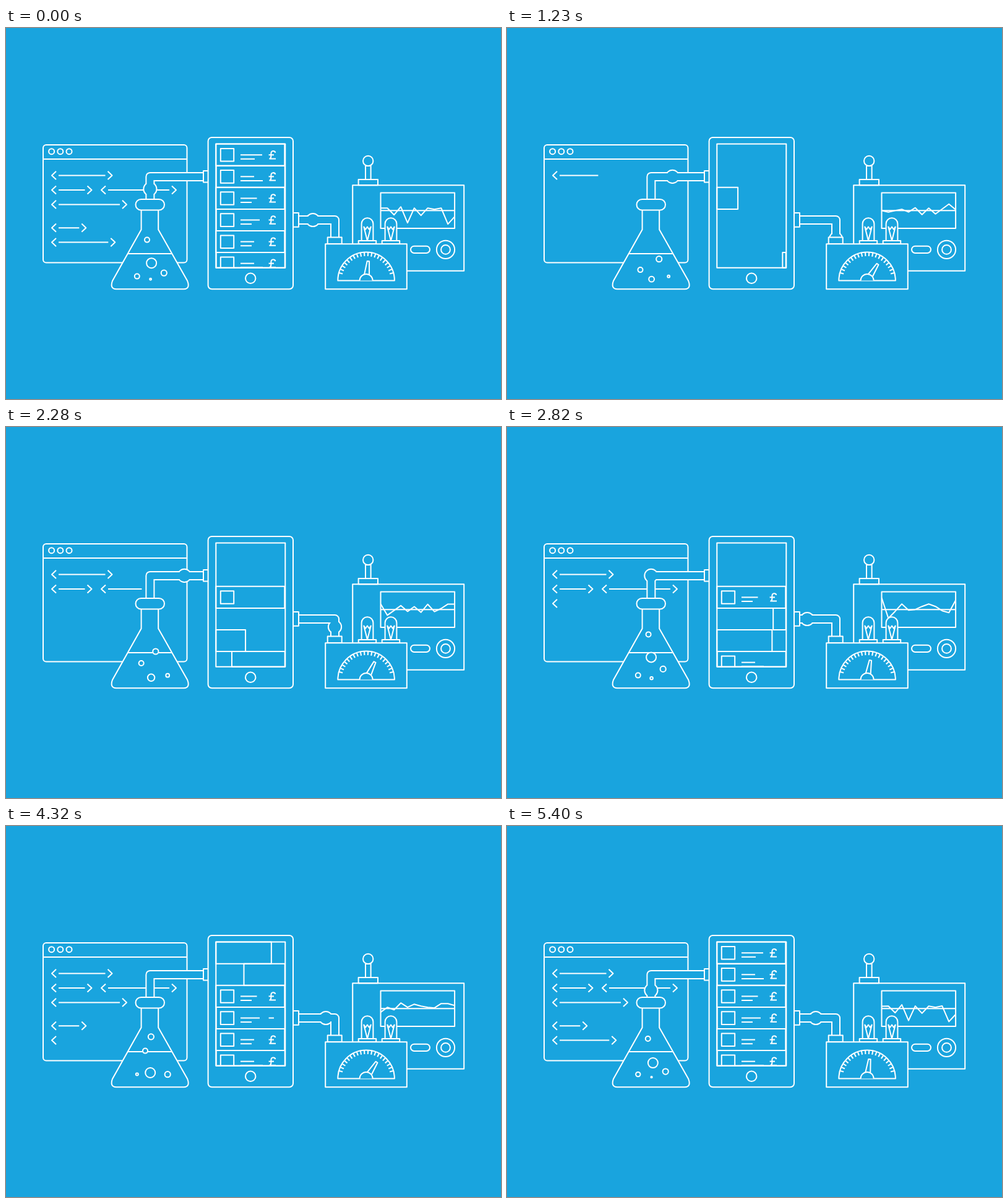
An HTML page that plays this animation: 800 by 600 pixels, repeating every 5.43 s.

```html
<!DOCTYPE html>
<html lang="en">
<head>
<meta charset="utf-8">
<title>Lab machine</title>
<style>
  html, body { margin: 0; width: 100%; height: 100%; overflow: hidden; background: #19a4de; }
  svg { display: block; width: 800px; height: 600px; }
  .line { fill: none; stroke: #fff; stroke-width: 2; stroke-linejoin: round; }
  .solid { fill: #19a4de; }
  .outer, .inner { fill: none; stroke-linejoin: round; }
  .outer { stroke: #fff; stroke-width: 15; }
  .inner { stroke: #19a4de; stroke-width: 11; }
</style>
</head>
<body>
<svg viewBox="0 0 800 600">
  <defs>
    <clipPath id="clipLeft"><rect x="200" y="215" width="119" height="64"/></clipPath>
    <clipPath id="clipRight"><rect x="473" y="290" width="80" height="50"/></clipPath>
    <clipPath id="clipScreen"><rect x="338" y="186" width="114" height="203"/></clipPath>
    <clipPath id="clipGraph"><rect x="605" y="266" width="120.5" height="59"/></clipPath>
  </defs>

  <g class="line">
    <rect x="60" y="189" width="232.5" height="190.5" rx="5"/>
    <path d="M60 212H292.5"/>
    <circle id="dot" cx="73.6" cy="199.7" r="4.5"/>
    <use href="#dot" x="14.2"/>
    <use href="#dot" x="28.4"/>
    <g id="code"></g>
  </g>

  <g id="pipeLeft" clip-path="url(#clipLeft)"></g>

  <g class="line">
    <path class="solid" d="M218.6 294V326L172 409Q167.5 421.500 178 422.3H287.5Q298 421.5 293.2 409L246.2 326V294"/>
    <path d="M196.8 365H268.5"/>
    <g id="bubbles" class="solid"></g>
    <rect class="solid" x="209.5" y="277" width="46.5" height="17.6" rx="8.8"/>

    <rect class="solid" x="319" y="231" width="10" height="18.6"/>
    <rect class="solid" x="326.6" y="177" width="137.4" height="245.2" rx="6"/>
    <rect x="339.3" y="187.5" width="112" height="200.3"/>
    <circle cx="395.2" cy="404.8" r="8.2"/>
    <g id="rows" clip-path="url(#clipScreen)"></g>
  </g>

  <g id="pipeRight" clip-path="url(#clipRight)"></g>

  <g class="line">
    <rect x="464" y="299" width="9" height="22.7"/>
    <rect x="560.2" y="254.2" width="180" height="138.5"/>
    <rect x="569.6" y="245" width="31.4" height="9.2"/>
    <path d="M581 245V222M589.6 245V222"/>
    <circle class="solid" cx="585.2" cy="214.9" r="8.2"/>
    <rect x="605.5" y="266.6" width="119.6" height="57.3"/>
    <path d="M605.5 295.2H725"/>
    <g clip-path="url(#clipGraph)"><path id="graph"/></g>
    <rect x="654" y="352.7" width="31" height="11.2" rx="5.6"/>
    <circle cx="710.5" cy="358.4" r="14.6"/>
    <circle cx="710.5" cy="358.4" r="7.4"/>

    <g id="bulb" class="solid">
      <path d="M574.6 344V316.6a9.4 9.4 0 0 1 18.8 0V344"/>
      <path d="M584 344L578.3 321.5l2.8 4.2 2.9-4.2 2.9 4.2 2.8-4.2z"/>
      <rect x="569.7" y="344" width="28.5" height="5.2"/>
    </g>
    <use href="#bulb" x="38"/>
    <rect class="solid" x="519.7" y="338.6" width="23" height="10.6"/>
    <rect class="solid" x="516.2" y="349.2" width="131.6" height="73"/>
    <g transform="translate(582.1 408.4)">
      <path d="M-45.8 0A45.8 45.8 0 0 1 45.8 0Z"/>
      <g id="ticks"></g>
      <path id="needle" class="solid" d="M-4-9.5L-1.7-31.5H1.7L4-9.5"/>
      <path class="solid" d="M-10.5 0a10.5 10.5 0 0 1 21 0"/>
    </g>
  </g>
</svg>

<script>
const LOOP = 5430, STEP = 30, BEAT = LOOP / 6, CLEARED = 660;
const $ = id => document.getElementById(id);

function add(parent, tag, attrs = {}) {
  const el = document.createElementNS('http://www.w3.org/2000/svg', tag);
  set(el, attrs);
  parent.appendChild(el);
  return el;
}
function set(el, attrs) {
  for (const k in attrs) el.setAttribute(k, attrs[k]);
}
const show = (el, on) => set(el, { display: on ? 'inline' : 'none' });
const clamp = x => Math.max(0, Math.min(1, x));
const mix = (a, b, k) => a + (b - a) * k;

// keys: [time, ...values]; two keys at one time make a jump
function at(keys, t, ease = x => x) {
  let i = 0;
  while (i < keys.length - 2 && keys[i + 1][0] <= t) i++;
  const [a, b] = [keys[i], keys[i + 1]];
  const k = ease(clamp((t - a[0]) / (b[0] - a[0])));
  return a.slice(1).map((v, n) => mix(v, b[n + 1], k));
}
const sway = x => (1 - Math.cos(Math.PI * x)) / 2;

// Code tags: y, left tip, line end, start time
const TYPING = 0.16;
const tags = [
  [238.4, 74, 160.5, 780], [262, 74, 127.5, 1403], [262, 154, 264, 1880],
  [285.4, 74, 184, 2800], [323.2, 74, 118.3, 3720], [346.6, 74, 165.3, 4290]
].map(([y, x, end, start]) => ({
  y, x, end, start,
  open: add($('code'), 'path', { d: `M${x + 7} ${y - 6.6}l-7 6.6l7 6.6` }),
  body: add($('code'), 'path'),
  close: add($('code'), 'path', { d: `M${end + 4} ${y - 6.6}l7 6.6l-7 6.6` })
}));

function drawCode(t) {
  for (const g of tags) {
    const from = g.x + 11, grown = (t - g.start - 60) * TYPING;
    show(g.open, t >= g.start);
    show(g.body, grown > 0);
    set(g.body, { d: `M${from} ${g.y}H${Math.min(g.end, from + grown)}` });
    show(g.close, t >= g.start + 90 + (g.end - from) / TYPING);
  }
}

// List rows: the ends of the two text lines and the start time
const ROW = 35.1, ROW_WIDTH = 111, ROW_TIME = 1450;
const rows = [
  [414, 402, 3150], [401, 415, 3455], [405.5, 397, 788],
  [410, 397, 2552], [401, 397, 1656], [401, 415, 1160]
].map(([end1, end2, start], i) => {
  const g = add($('rows'), 'g', { transform: `translate(0 ${187.6 + ROW * i})` });
  return {
    end1, end2, start, fromRight: i % 2 === 1,
    box: add(g, 'rect', { y: 0, height: i < 5 ? ROW : 24.7 }),
    icon: add(g, 'rect', { x: 346.8, y: 7.4, width: 21.4, height: 20.6 }),
    one: add(g, 'path'),
    two: add(g, 'path'),
    bar: add(g, 'path', { d: 'M424.6 17.6h8.4' }),
    pound: add(g, 'path', { d: 'M435.4 14C434.3 10.5 428.4 10.2 428.4 15.5V19.5Q428.4 23 426.2 23.8H436' })
  };
});

function drawRows(t) {
  for (const r of rows) {
    const w = ROW_WIDTH * clamp((t - r.start) / ROW_TIME);
    const age = t - r.start - ROW_TIME;
    const textLine = (el, y, end, delay) => {
      show(el, age > delay);
      set(el, { d: `M379 ${y}H${mix(379, end, clamp((age - delay) / 60))}` });
    };
    show(r.box, w > 0);
    set(r.box, { x: r.fromRight ? 450.7 - w : 339.3, width: w });
    show(r.icon, age >= 20);
    textLine(r.one, 17.6, r.end1, 60);
    textLine(r.two, 24.2, r.end2, 120);
    show(r.bar, age >= 260);
    show(r.pound, age >= 350);
  }
}

// A pipe is a wide white stroke under a narrower blue one, so the bulge merges with it
function makePipe(group, d) {
  add(group, 'path', { d, class: 'outer' });
  const rim = add(group, 'circle', { r: 11.6, fill: '#fff' });
  add(group, 'path', { d, class: 'inner' });
  const core = add(group, 'circle', { r: 9.6, fill: '#19a4de' });
  return (cx, cy) => [rim, core].forEach(c => set(c, { cx, cy }));
}
const leftBulge = makePipe($('pipeLeft'), 'M232.9 285V240.4H330');
const rightBulge = makePipe($('pipeRight'), 'M465 310.5H531.5V345');

// Distances along each pipe over one beat
const leftPath = [[0, -20], [25, -14], [80, 0], [660, 92], [760, 100], [760, -50], [840, -32], [BEAT, -20]];
const rightPath = [[0, 23], [300, -8], [300, 92], [660, 48], [BEAT, 23]];

function drawPipes(flaskBeat, meterBeat) {
  const [s] = at(leftPath, flaskBeat);
  leftBulge(232.9 + Math.max(0, s), 240.4 - Math.min(0, s));
  const [d] = at(rightPath, meterBeat);
  rightBulge(473 + Math.min(58.5, d), 310.5 + Math.max(0, d - 58.5));
}

// Bubbles swell where they are born, then rise: [time, x, y]
const bubbles = [
  { born: 840, ripe: 1565, size: 8, path: [[1200, 233.6, 406.2], [1565, 236.3, 403.8],
    [1620, 233.2, 399], [1745, 236.8, 386.5], [1930, 232, 368.5]] },
  { born: 600, ripe: 905, size: 4, path: [[1050, 211.8, 401.6], [1565, 224.2, 366.2],
    [1620, 225, 363.6], [1745, 227.5, 345.8], [1810, 228, 342.6], [1950, 229, 330]] },
  { born: 150, ripe: 660, size: 4.6, path: [[715, 261.2, 401.7], [905, 255.3, 396.2],
    [985, 252.2, 391.4], [1565, 235, 344.2], [1700, 233.5, 336]] }
];
for (const b of bubbles) b.dots = [0, 1, 2].map(() => add($('bubbles'), 'circle'));

function drawBubbles(beat) {
  for (const b of bubbles) b.dots.forEach((dot, n) => {
    const age = beat + n * BEAT;
    const [cx, cy] = at(b.path, age);
    show(dot, age >= b.born && age < b.path[b.path.length - 1][0]);
    set(dot, { cx, cy, r: mix(0.8, b.size, clamp((age - b.born) / (b.ripe - b.born))) });
  });
}

// The flask runs slightly unevenly
const flaskClock = [[0, 0], [660, 660], [1800, 1745], [2820, 2795], [3690, 3645], [4320, 4335], [LOOP, LOOP]];

// Graph heights above the middle line
const flat = Array(12).fill(0);
const noisy = [4, 4, -7, 6, -20, 4, -8, 4, 2, 4, -22, -10];
const climb = [0, -5, 0, 4, -5, 9, -13, 8, -11, 5, 21, 3];
const bowl = [19, -14, -3, 9, -1, 0, 5, 9, 5, -2, -5, 15];
const calm = [-6, 2, -2, 9, 2, 7, 4, 2, 1, 8, 8, 5];
const heights = [
  [0, ...noisy], [CLEARED, ...flat], [1800, ...climb], [2820, ...bowl],
  [3690, ...flat], [4320, ...calm], [LOOP, ...noisy]
];
function drawGraph(t) {
  const points = at(heights, t).map((h, i) => `${605.5 + i * 10.87} ${295.2 - h}`);
  set($('graph'), { d: 'M' + points.join('L') });
}

const angles = [[0, 6], [660, 25], [1800, 40], [2820, 9.6], [3690, 4], [4320, 32.5], [5400, 7], [LOOP, 6]];
for (let i = 0; i < 20; i++) {
  add($('ticks'), 'path', { d: 'M0-45.5V-39.5', transform: `rotate(${(i - 9.5) * 7.8})` });
}

function draw(t) {
  const leaving = t < CLEARED, built = leaving ? LOOP : t;
  const opacity = leaving ? 1 - clamp((t - 330) / 300) : 1;
  set($('code'), { opacity });
  set($('rows'), { opacity });
  drawCode(built);
  drawRows(built);
  const flaskBeat = at(flaskClock, t)[0] % BEAT;
  drawPipes(flaskBeat, t % BEAT);
  drawBubbles(flaskBeat);
  drawGraph(t);
  set($('needle'), { transform: `rotate(${at(angles, t, sway)[0]})` });
}

const start = performance.now();
function tick() {
  const t = (performance.now() - start) % LOOP;
  draw(Math.floor(t / STEP) * STEP);
  requestAnimationFrame(tick);
}
tick();
</script>
</body>
</html>
```
